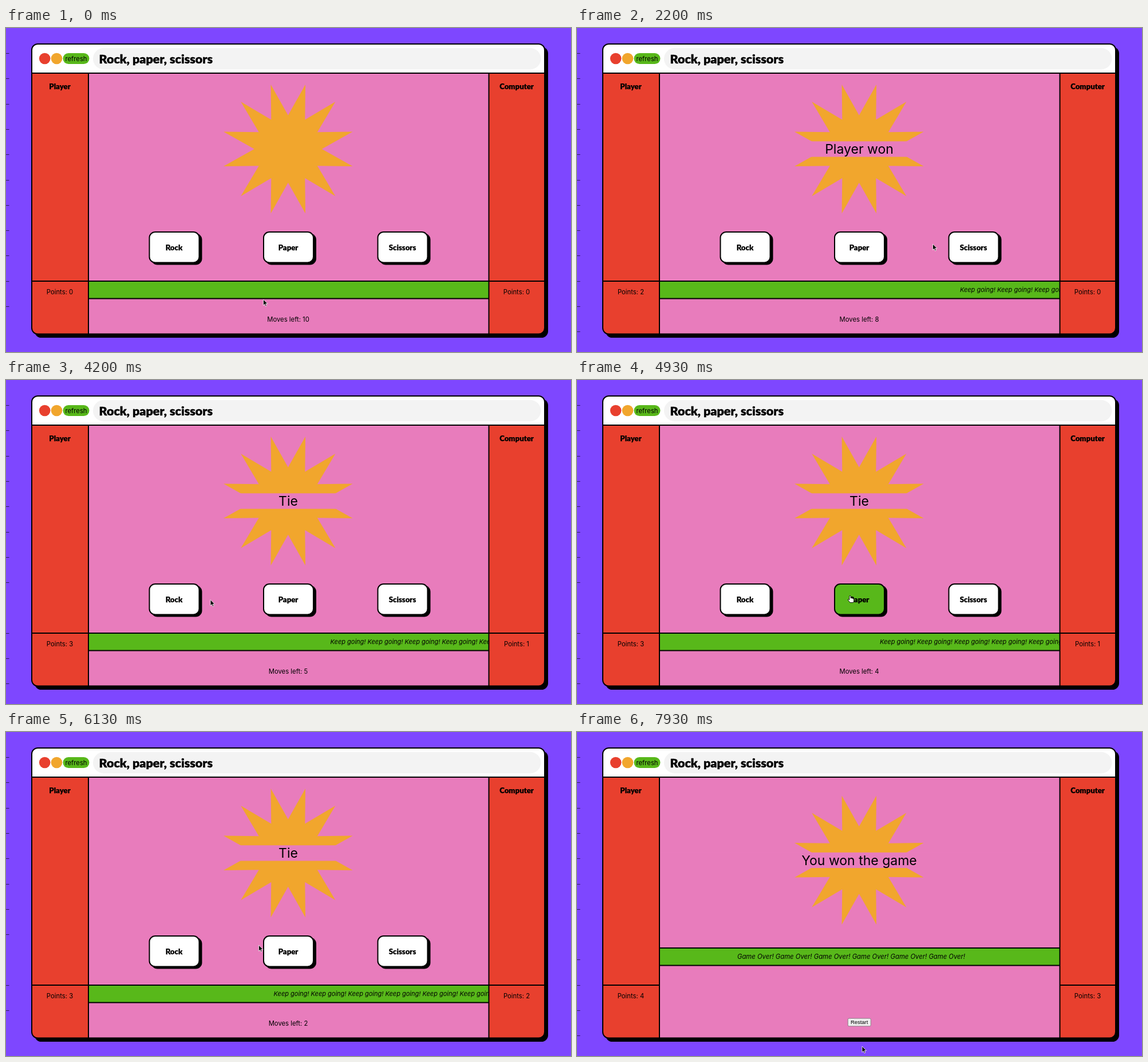
These frames come from a looping animation (987 px wide and 567 px high, 8 s). An HTML page:

```html
<!DOCTYPE html>
<html lang="en">
<head>
<meta charset="utf-8">
<title>Rock, paper, scissors</title>
<style>
html, body { margin: 0; width: 100%; height: 100%; overflow: hidden; background: #7e47ff; }
svg { display: block; width: 987px; height: 567px; }
text { font: 11.3px Inter, sans-serif; text-anchor: middle; white-space: pre; }
.display { font: 900 13.2px Lato, sans-serif; stroke: #000; stroke-width: .25; stroke-linejoin: round; }
.title { font-size: 21.5px; text-anchor: start; stroke-width: .4; }
.result { font-size: 23px; }
.marquee { font-size: 11px; font-style: italic; text-anchor: start; }
.over .marquee { font-size: 11.3px; }
.restart { font: 9.4px "Liberation Sans", Arial, sans-serif; }
.line { fill: none; stroke: #000; stroke-width: 2; }
.red { fill: #e8402e; }
.orange { fill: #f1a62d; }
.green { fill: #58b81a; }
.pink { fill: #e87cbc; }
.over .playing, svg:not(.over) .finished { display: none; }
</style>
</head>
<body>
<svg id="stage" viewBox="0 0 987 567">
  <defs>
    <clipPath id="frame"><rect x="45" y="28" width="896" height="507.5" rx="10.5"/></clipPath>
    <clipPath id="slot"><rect x="145" y="0" width="697.7" height="567"/></clipPath>
  </defs>
  <g id="ticks" stroke="#2b1c5c"></g>
  <rect x="50" y="33" width="897" height="509" rx="11.5"/>
  <g clip-path="url(#frame)">
    <rect x="45" y="28" width="896" height="508" fill="#fff"/>
    <rect class="red" x="45" y="79" width="896" height="457"/>
    <rect class="pink" x="144" y="79" width="699.5" height="457"/>
  </g>
  <rect x="152" y="35" width="782.5" height="37.5" rx="18.7" fill="#f3f3f3"/>
  <circle class="red" cx="67.7" cy="53.5" r="9.8"/>
  <circle class="orange" cx="88.5" cy="53.5" r="9.8"/>
  <rect class="green" x="99.5" y="44" width="46" height="19" rx="9.5"/>
  <text x="122.5" y="58">refresh</text>
  <text class="display title" x="162.5" y="62">Rock, paper, scissors</text>

  <g id="burst">
    <polygon id="star" class="orange"/>
    <g id="banner">
      <rect class="pink" x="145" y="198.3" width="697" height="27.2"/>
      <text id="result" class="result" x="493" y="220"></text>
    </g>
  </g>
  <g id="band">
    <rect class="green" x="144" y="443" width="699" height="30.5"/>
    <path class="line" d="M144 443H843M144 473.5H843"/>
    <g clip-path="url(#slot)"><text id="marquee" class="marquee" y="462"></text></g>
  </g>
  <path class="line" d="M45 79H941M144 79V535M843.5 79V535M45 443H144M843.5 443H941"/>
  <rect class="line" x="45" y="28" width="896" height="507.5" rx="10.5"/>

  <text class="display" x="94" y="106.5">Player</text>
  <text class="display" x="892" y="106.5">Computer</text>
  <text id="player" x="94" y="465.5"></text>
  <text id="computer" x="892" y="465.5"></text>
  <g class="playing">
    <g id="buttons"></g>
    <text id="moves" x="493" y="514"></text>
  </g>
  <g class="finished">
    <rect x="473.2" y="501.2" width="40" height="13.6" rx="2" fill="#efefef" stroke="#767676" stroke-width=".8"/>
    <text class="restart" x="493.2" y="511.3">Restart</text>
  </g>
  <g id="cursor" stroke-linejoin="round">
    <path id="arrow" fill="#000" stroke="#fff" stroke-width=".8" d="M0 0V10.5L2.5 8.2 4 12 5.8 11.2 4.2 7.6H7.5Z"/>
    <path id="hand" fill="#fff" stroke="#000" stroke-width=".9" d="M-1.2 1.2Q-1.2 0 0 0T1.2 1.2V4.2Q2.4 3.4 3.2 4.5 4.4 4 5 5.1 6.6 4.8 6.6 6.4V9Q6.4 10.5 5.6 12H0Q-1.2 10.2-3.6 7.6-4.2 6.2-2.6 6.2L-1.2 7.4Z"/>
  </g>
</svg>
<script>
const LOOP = 8000, STEP = 1000 / 15;
const $ = id => document.getElementById(id);

// time, winner of the round
const rounds = [
  [900, 'Player'], [1600, 'Player'], [2450, 'Computer'], [3000, 'Player'], [3700, ''],
  [4500, ''], [5300, 'Computer'], [5850, ''], [6800, 'Player'], [7400, 'Computer']
];
// time, x, y
const path = [
  [0, 449.5, 475], [470, 449.5, 475], [820, 300, 386], [1000, 300, 385],
  [1500, 490, 385], [1720, 494, 385], [2200, 621.5, 378], [2400, 686, 379],
  [3050, 688, 380], [3400, 557, 383], [3600, 500, 386], [3800, 496, 386],
  [4350, 305, 384], [4600, 308, 384], [4930, 474.5, 377.5], [5200, 680, 378],
  [5380, 682, 378], [5750, 318, 372], [5920, 320, 372], [6130, 440, 373],
  [6650, 684, 370], [7070, 690.5, 369], [7420, 688, 372], [7800, 505, 540], [7930, 498, 550]
];
// start time, indices of hidden edge ticks
const tickGaps = [[0, [11]], [70, []], [3930, [8]], [5500, [8, 11]], [6530, [6, 8]], [7470, [7]]];

const buttons = ['Rock', 'Paper', 'Scissors'].map((label, i) => ({ label, x: 250.5 + i * 199.5 }));
$('buttons').innerHTML = buttons.map(({ label, x }) => `
  <rect x="${x + 3}" y="359.5" width="89" height="55" rx="11"/>
  <rect class="face" x="${x}" y="357" width="87" height="53.5" rx="10" stroke="#000" stroke-width="2"/>
  <text class="display" x="${x + 43}" y="388.7">${label}</text>`).join('');
const faces = [...document.querySelectorAll('.face')];

$('ticks').innerHTML = Array.from({ length: 12 }, (_, i) =>
  `<path d="M0 ${Math.round(44 + i * 44.3) + .5}H5.5"/>`).join('');
const ticks = [...$('ticks').children];

$('star').setAttribute('points', Array.from({ length: 24 }, (_, i) => {
  const angle = i * Math.PI / 12, radius = i % 2 ? 116.8 : 59;
  return [492.8 + radius * Math.sin(angle), 211.7 - radius * Math.cos(angle)].map(n => n.toFixed(2));
}).join(' '));

function show(el, on) { el.style.display = on ? '' : 'none'; }
function setText(id, value) { if ($(id).textContent !== value) $(id).textContent = value; }
function shift(id, x, y) { $(id).setAttribute('transform', `translate(${x} ${y})`); }

function cursorAt(t) {
  const i = path.findIndex(p => p[0] > t);
  if (i < 0) return path.at(-1).slice(1);
  const [a, b] = [path[i - 1], path[i]];
  const k = (t - a[0]) / (b[0] - a[0]);
  return [a[1] + (b[1] - a[1]) * k, a[2] + (b[2] - a[2]) * k];
}

function render(t) {
  const played = rounds.filter(r => r[0] <= t);
  const over = played.length === rounds.length;
  const points = name => played.filter(r => r[1] === name).length;
  const winner = played.length ? played.at(-1)[1] : '';

  $('stage').classList.toggle('over', over);
  setText('player', `Points: ${points('Player')}`);
  setText('computer', `Points: ${points('Computer')}`);
  setText('moves', `Moves left: ${rounds.length - played.length}`);
  setText('result', over ? 'You won the game' : winner ? `${winner} won` : 'Tie');
  show($('banner'), played.length > 0);
  shift('burst', 0, over ? 12.5 : 0);
  shift('band', 0, over ? -65 : 0);

  setText('marquee', over ? 'Game Over! '.repeat(6) : played.length ? 'Keep going! '.repeat(10) : '');
  const start = over ? 280 + .0512 * (7933 - t) : 669 - .0512 * (t - 2200);
  $('marquee').setAttribute('x', start.toFixed(2));

  const [x, y] = cursorAt(t);
  const hovered = buttons.findIndex(b => !over && x > b.x && x < b.x + 88 && y > 356 && y < 412);
  faces.forEach((face, i) => face.setAttribute('fill', i === hovered ? '#58b81a' : '#fff'));
  show($('arrow'), hovered < 0);
  show($('hand'), hovered >= 0);
  shift('cursor', x, y);

  const hidden = tickGaps.filter(g => g[0] <= t).at(-1)[1];
  ticks.forEach((tick, i) => show(tick, !hidden.includes(i)));
}

const origin = performance.now();
function frame() {
  const t = (performance.now() - origin) % LOOP;
  render(Math.floor((t + 4) / STEP) * STEP % LOOP);
  requestAnimationFrame(frame);
}
frame();
</script>
</body>
</html>
```
